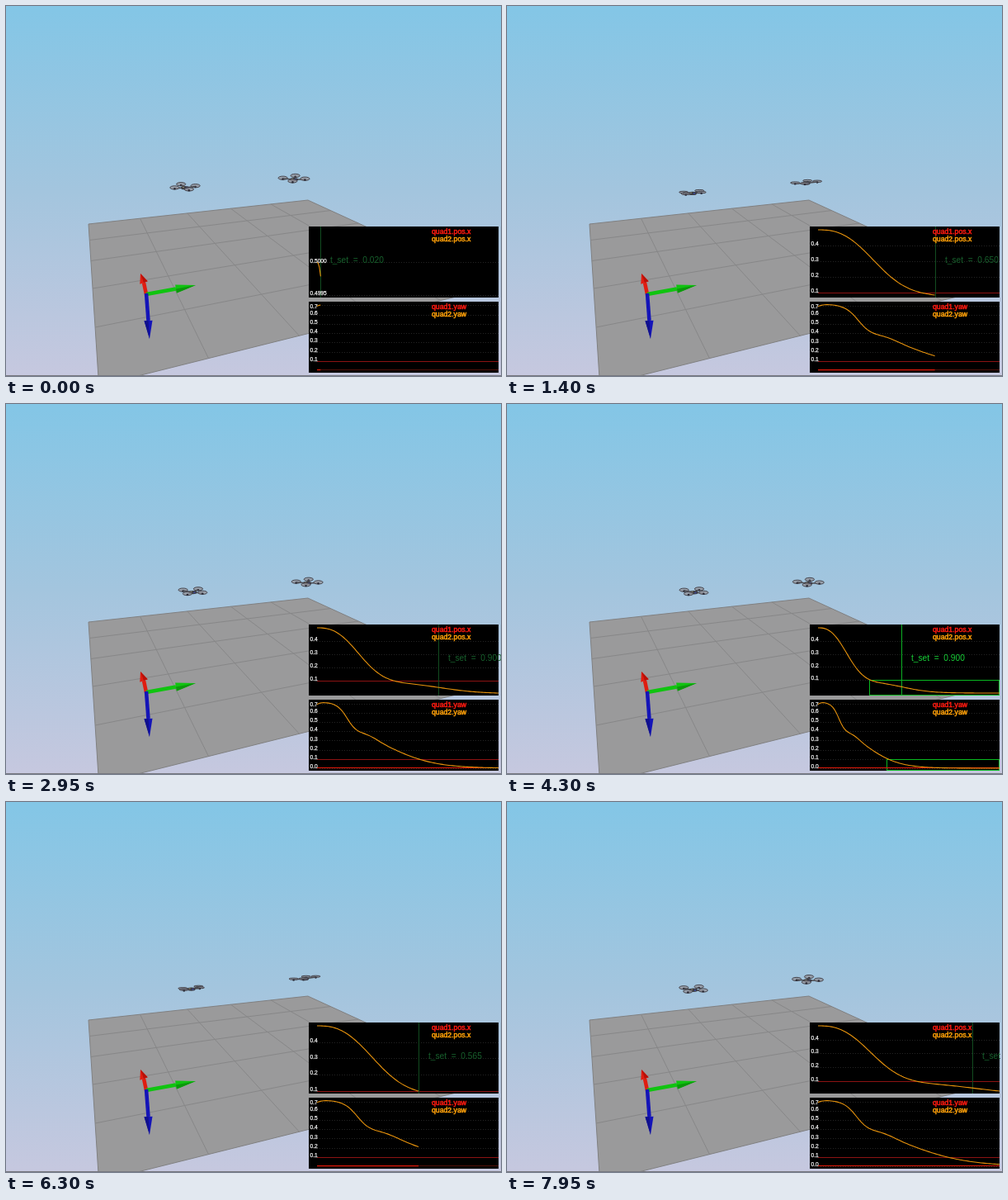
These frames come from a looping animation (600 px wide and 448 px high, 8000 ms). An HTML page with a canvas:

```html
<!DOCTYPE html>
<html lang="en">
<head>
<meta charset="utf-8">
<title>Two quadrotors settling</title>
<style>
  html, body { margin: 0; width: 100%; height: 100%; overflow: hidden; background: #a3c5df; }
  canvas { display: block; }
</style>
</head>
<body>
<canvas id="stage" width="600" height="448"></canvas>
<script>
const ctx = document.getElementById('stage').getContext('2d');
const FONT = '"Liberation Sans", Arial, sans-serif';
const LOOP = 8000, FRAME = 50, RESTART = 4450;
const SETTLE = 0.9, HOLD = 0.5, BAND = 0.1;
const LEFT = 377, RIGHT = 597, PLOT_H = 79;
const DIM_GREEN = '#17602c', RED = '#ff1a10', ORANGE = '#ffa008', CURVE = '#e8930c';

// Responses of the controller over simulated seconds.
const fall = (t, center, width) => 1 / (1 + Math.exp((t - center) / width));
const bell = (t, center, width) => Math.exp(-(((t - center) / width) ** 2));
const posX = t => .4102 * Math.exp(-((t / .366) ** 2.64)) + .09 * fall(t, .92, .15);
const yaw = t => .29 * fall(t, .225, .035) + .45 * fall(t, .54, .17)
  + .03 * bell(t, .38, .1) - .032 * Math.exp(-t / .03);
const flatness = t => 1 - .65 * bell(t, .58, .17);
const lean = t => .06 * bell(t, .2, .12) - .12 * bell(t, .57, .13);

function line(x0, y0, x1, y1, color, width = 1, dash = []) {
  ctx.strokeStyle = color;
  ctx.lineWidth = width;
  ctx.setLineDash(dash);
  ctx.beginPath();
  ctx.moveTo(x0, y0);
  ctx.lineTo(x1, y1);
  ctx.stroke();
  ctx.setLineDash([]);
}

function polygon(points, color) {
  ctx.fillStyle = color;
  ctx.beginPath();
  points.forEach(p => ctx.lineTo(...p));
  ctx.fill();
}

function ellipse(x, y, rx, ry, fill, stroke) {
  ctx.beginPath();
  ctx.ellipse(x, y, rx, ry, 0, 0, 2 * Math.PI);
  ctx.fillStyle = fill;
  ctx.fill();
  if (stroke) {
    ctx.strokeStyle = stroke;
    ctx.lineWidth = 1;
    ctx.stroke();
  }
}

function label(text, x, y, size, color, outline = 0) {
  ctx.font = `${size}px ${FONT}`;
  ctx.fillStyle = ctx.strokeStyle = color;
  ctx.lineWidth = outline;
  ctx.fillText(text, x, y);
  if (outline) ctx.strokeText(text, x, y);
}

// Perspective position on the floor; u runs right, v towards the viewer.
function floorPoint(u, v) {
  const a = .23 * u, b = -.558 * v, w = 1 + a + b;
  return [(100 + 1522 * a + 90 * b) / w, (264 + 109 * (a + b)) / w];
}

function drawFloor() {
  const corners = [[0, 0], [1, 0], [1, 1], [0, 1]].map(c => floorPoint(...c));
  polygon(corners, '#9a9a9b');
  for (let i = 0; i <= 5; i++) {
    const s = i / 5, color = i % 5 ? '#878788' : '#808081';
    line(...floorPoint(s, 0), ...floorPoint(s, 1), color);
    line(...floorPoint(0, s), ...floorPoint(1, s), color);
  }
}

function arrow(x0, y0, neckX, neckY, tipX, tipY, color, shade) {
  const len = Math.hypot(tipX - neckX, tipY - neckY), half = 5;
  const nx = -(tipY - neckY) / len * half, ny = (tipX - neckX) / len * half;
  line(x0, y0, neckX, neckY, color, 4.5);
  polygon([[neckX + nx, neckY + ny], [tipX, tipY], [neckX - nx, neckY - ny]], color);
  polygon([[neckX + nx, neckY + ny], [tipX, tipY], [neckX, neckY]], shade);
}

function drawScene() {
  const sky = ctx.createLinearGradient(0, 0, 0, 448);
  sky.addColorStop(0, '#83c6e6');
  sky.addColorStop(.5, '#a3c5de');
  sky.addColorStop(1, '#c6c8df');
  ctx.fillStyle = sky;
  ctx.fillRect(0, 0, 600, 448);
  drawFloor();
  arrow(170, 349, 167, 335, 163, 324, '#e01c10', '#b81008');
  arrow(170, 349, 206, 342.5, 230, 338, '#10c410', '#0c980c');
  arrow(170, 348, 172.5, 381, 174, 403, '#1414b8', '#10108c');
  line(0, 447.5, 600, 447.5, '#77787f');
}

function drawDrone(x, y, turn, t) {
  const open = flatness(t), tilt = lean(t);
  const rotors = [0, 1, 2, 3].map(k => {
    const a = turn + k * Math.PI / 2, dx = 13.5 * Math.cos(a);
    return [x + dx, y + 3.3 * open * Math.sin(a) + tilt * dx];
  }).sort((a, b) => a[1] - b[1]);
  const drawRotor = ([rx, ry]) => {
    ellipse(rx, ry - .8, 5.6, .5 + 1.6 * open, 'rgba(150,150,158,.8)', '#44444c');
    ellipse(rx, ry + .5, 1.3, 1.2, '#2c2c38');
  };
  rotors.slice(0, 2).forEach(drawRotor);
  rotors.forEach(r => line(x, y + .5, ...r, '#4a4a50', 1.5));
  ellipse(x, y + .6, 5, 2.2, '#3c3c42');
  ellipse(x + 2, y + .8, 1.3, 1, '#3c4890');
  ellipse(x - 2, y, 1.2, .8, '#88846a');
  rotors.slice(2).forEach(drawRotor);
}

function tickStep(range) {
  if (range > .2) return .1;
  const p = 10 ** Math.floor(Math.log10(range) + 1e-9);
  return range < 2 * p ? p / 2 : p;
}

function drawPlot({ top, name, value, hi, lo, t, settled, entered, draw }) {
  const scale = (RIGHT - LEFT) / Math.max(t, 1.01);
  const px = s => LEFT + s * scale;
  const py = v => top + 4 + (hi - v) / (hi - lo) * PLOT_H;
  const row = v => Math.round(py(v)) + .5;
  ctx.fillStyle = '#000';
  ctx.fillRect(367, top, 230, 86);

  const step = tickStep(hi - lo);
  const digits = step < .01 ? 4 : step < .1 ? 2 : 1;
  const ticks = [];
  for (let i = Math.ceil(lo / step - 1e-6); i * step < hi - step * .02; i++) ticks.push(i * step);
  ticks.forEach(v => line(LEFT, row(v), RIGHT, row(v), '#242424', 1, [1, 2]));

  const band = row(BAND);
  if (settled) {
    const x = Math.round(px(entered)) + .5;
    ctx.strokeStyle = '#08b820';
    ctx.lineWidth = 1;
    ctx.strokeRect(x, band, RIGHT - .5 - x, top + 85.5 - band);
  } else if (lo < BAND + .001) {
    line(LEFT, band, RIGHT, band, '#8c1212');
  }

  draw(px, py);
  ctx.strokeStyle = CURVE;
  ctx.lineWidth = 1.1;
  ctx.beginPath();
  const count = Math.max(2, Math.ceil(t * scale / 2));
  for (let i = 0; i <= count; i++) ctx.lineTo(px(t * i / count), py(value(t * i / count)));
  ctx.stroke();

  ticks.forEach(v => label(Math.abs(v).toFixed(digits), 368.5, Math.max(py(v) + .2, top + 7.5), 6.6, '#f4f4f4', .25));
  label('quad1.' + name, 516, top + 9, 8.7, RED, .5);
  label('quad2.' + name, 516, top + 18, 8.7, ORANGE, .5);
}

function render(now) {
  const time = Math.floor(now % LOOP / FRAME) * FRAME;
  const t = time < RESTART ? .02 + time * .00045 : .01 + (time - RESTART) * .0003;
  const settled = t >= SETTLE + HOLD;
  const moved = 1 - posX(t) / .5;

  drawScene();
  drawDrone(217 + 9.5 * moved, 219.6 + 8 * moved, .5 + yaw(t), t);
  drawDrone(349 + 16.3 * moved, 209.5 + 7 * moved ** 2.5, .12, t);

  let hi = .5, lo = posX(t);
  if (hi - lo < .001) [hi, lo] = [.5005, .4995];
  drawPlot({
    top: 267, name: 'pos.x', value: posX, hi, lo, t, settled, entered: .555,
    draw(px) {
      const mark = Math.min(t, SETTLE), x = Math.round(px(mark)) + .5;
      line(x, 267, x, 353, settled ? '#0cb024' : '#124c20');
      const shown = (Math.round(mark * 200 - 1e-6) / 200).toFixed(3);
      // No-break spaces keep the wide gaps around the sign.
      label(`t_set\u00a0 =\u00a0 ${shown}`, x + 11.5, 311, 10.2, settled ? '#18d038' : DIM_GREEN);
    }
  });
  drawPlot({
    top: 358, name: 'yaw', value: yaw, hi: yaw(Math.min(t, .08)), lo: t > .8 ? 0 : .0005,
    t, settled, entered: .74,
    draw(px, py) {
      const y = py(0) - .5;
      line(LEFT, y, RIGHT, y, '#501008');
      line(LEFT, y, px(t), y, '#e01808', 1.2);
    }
  });
}

const start = performance.now();
function tick() {
  render(performance.now() - start);
  requestAnimationFrame(tick);
}
tick();
</script>
</body>
</html>
```
